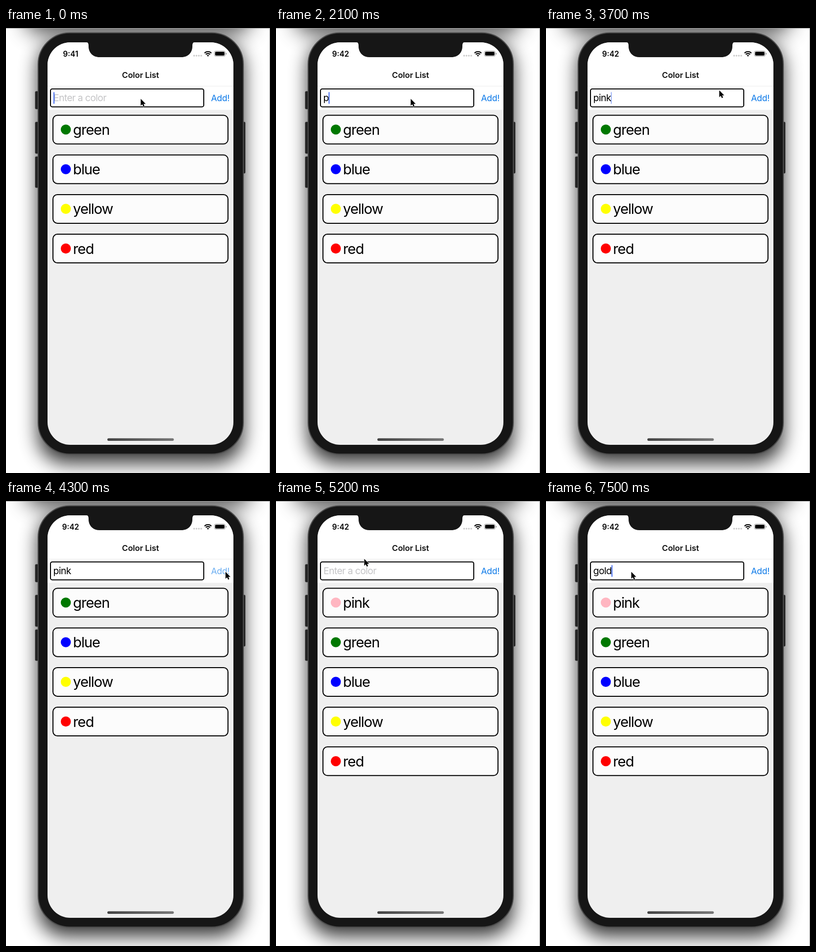
Recreate the animation shown at these times as an HTML page. Size 534 by 900 pixels, loop 8 s.

```html
<!DOCTYPE html>
<html lang="en">
<head>
<meta charset="utf-8">
<title>Color List</title>
<style>
  html, body { margin: 0; width: 100%; height: 100%; overflow: hidden; background: #fff; }
  svg { display: block; width: 100vw; height: 100vh; }
  text { font-family: Inter, "Liberation Sans", sans-serif; font-optical-sizing: none; }
  .bold { font-weight: 600; text-anchor: middle; }
  .field { font-size: 19.3px; letter-spacing: -.034em; }
  .row text { font-size: 29px; letter-spacing: -.038em; }
  .row rect { fill: #fcfcfc; stroke: #000; stroke-width: 2; }
</style>
</head>
<body>
<svg viewBox="0 0 534 900">
  <defs>
    <filter id="blur" x="-30%" y="-30%" width="160%" height="160%"><feGaussianBlur stdDeviation="19"/></filter>
    <filter id="haze" x="-30%" y="-200%" width="160%" height="500%"><feGaussianBlur stdDeviation="22"/></filter>
    <linearGradient id="bar"><stop stop-color="#444"/><stop offset="1" stop-color="#777"/></linearGradient>
    <clipPath id="screen"><rect x="84" y="29" width="376" height="814" rx="46"/></clipPath>
  </defs>

  <!-- backdrop and shadows -->
  <rect width="534" height="900" fill="#fff"/>
  <rect x="42" y="-60" width="450" height="68" rx="20" opacity=".75" filter="url(#haze)"/>
  <rect x="65" y="24" width="415" height="856" rx="56" opacity=".8" filter="url(#blur)"/>
  <path d="M0 .5H534M533.5 0V900" stroke="#999"/>

  <!-- phone -->
  <g fill="#242424" stroke="#444" stroke-width=".6">
    <rect x="59" y="128" width="9" height="36" rx="2"/>
    <rect x="59" y="190" width="9" height="64" rx="2"/>
    <rect x="59" y="260" width="9" height="63" rx="2"/>
    <rect x="476" y="190" width="8" height="104" rx="2"/>
  </g>
  <rect x="65" y="9.8" width="415" height="852" rx="64" fill="#161616" stroke="#4c4c4c" stroke-width="2"/>
  <g clip-path="url(#screen)">
    <rect x="84" y="29" width="376" height="814" fill="#efefef"/>
    <rect x="84" y="29" width="376" height="136.5" fill="#fff"/>
    <path d="M84 117.5H460" stroke="#ededed"/>
  </g>
  <path d="M160 28q7 0 7 7v2c0 13 9 22 22 22h166c13 0 22-9 22-22v-2q0-7 7-7z" fill="#161616"/>

  <!-- status bar -->
  <text id="clock" class="bold" x="130.7" y="57.5" font-size="15.3"></text>
  <g fill="#ccc">
    <circle cx="380.5" cy="56" r="1.8"/><circle cx="385.3" cy="56" r="1.8"/>
    <circle cx="390.1" cy="56" r="1.8"/><circle cx="394.9" cy="56" r="1.8"/>
  </g>
  <path d="M401.6 50.7a9.7 9.7 0 0 1 13.8 0M404.1 53.5a6.2 6.2 0 0 1 8.8 0" fill="none" stroke="#000" stroke-width="2.1"/>
  <path d="M408.5 57.8l-2.2-2.3a3.1 3.1 0 0 1 4.4 0z"/>
  <rect x="421.5" y="46.5" width="22" height="10.8" rx="3" fill="none" stroke="#999"/>
  <rect x="423" y="48" width="19" height="7.8" rx="1.7"/>
  <path d="M444.8 50q1.6.5 1.6 2t-1.6 2z" fill="#888"/>

  <!-- header -->
  <text class="bold" x="272" y="101.3" font-size="16.5" letter-spacing="-.1" fill="#111">Color List</text>
  <rect x="90" y="123.2" width="310" height="36.2" rx="3.5" fill="#fff" stroke="#000" stroke-width="2"/>
  <text id="hint" class="field" x="96" y="148.4" fill="#c4c4c6">Enter a color</text>
  <text id="typed" class="field" x="95.5" y="148.4"></text>
  <rect id="caret" y="129.5" width="2" height="24" rx="1" fill="#426bf2"/>
  <text id="add" x="414.7" y="148" font-size="17.4" letter-spacing="-.15" fill="#0a78e8">Add!</text>

  <g id="list"></g>
  <rect x="205" y="829.7" width="134.5" height="5.2" rx="2.6" fill="url(#bar)"/>
  <path id="pointer" d="M0 0V14L3.2 11 5.2 15.7 7.7 14.6 5.7 10.2H10Z" stroke="#fff" stroke-width="1.2" paint-order="stroke"/>
</svg>
<script>
const $ = id => document.getElementById(id);
const LOOP = 8000, STEP = 100, PITCH = 80.2, KEY_GAP = 165;
const CLOCK_TICK = 1400, TYPE_PINK = 2100, ADDED = 4500, FOCUS = 5800, TYPE_GOLD = 7000;

const clamp = v => Math.max(0, Math.min(1, v));
const ramp = (t, from, length) => clamp((t - from) / length);

const colors = { pink: '#ffb6c1', green: '#007800', blue: '#00f', yellow: '#ff0', red: '#f00' };
$('list').innerHTML = Object.entries(colors).map(([name, fill], i) => `
  <g class="row" transform="translate(0 ${i * PITCH})">
    <rect x="95" y="176.5" width="354" height="58" rx="9"/>
    <circle cx="121" cy="205.4" r="10.2" fill="${fill}"/>
    <text x="135.5" y="216">${name}</text>
  </g>`).join('');
const newRow = $('list').firstElementChild;

// The field's text and the moment of the last key press or focus
function fieldAt(t) {
  const [word, start, focus] = t < ADDED ? ['pink', TYPE_PINK, 0] : ['gold', TYPE_GOLD, FOCUS];
  const count = Math.min(word.length, Math.floor((t - start) / KEY_GAP) + 1);
  return count > 0
    ? { text: word.slice(0, count), since: start + (count - 1) * KEY_GAP }
    : { text: '', since: focus };
}

// Solid at first, then fading out and in once a second
function blink(age) {
  if (age < 0) return 0;
  if (age < 300) return 1;
  return clamp((Math.abs((age + 700) % 1000 - 500) - 100) / 400);
}

// The pointer flies to the button in an even arc and returns with a soft landing
function pointerAt(t) {
  const there = ramp(t, 3200, 1100), back = ramp(t, 4800, 700);
  const x = 272.5 + 171.5 * there - 271.5 * (1 - (1 - back) ** 4.5);
  const y = 143.3 - 17.5 * Math.sin(Math.PI * there) - 27 * Math.sin(Math.PI * back);
  return `translate(${x} ${y})`;
}

function draw(t) {
  const { text, since } = fieldAt(t), added = t >= ADDED;
  $('typed').textContent = text;
  $('hint').style.opacity = text ? 0 : 1;
  $('caret').setAttribute('x', 96 + (text ? $('typed').getComputedTextLength() - .8 : 0));
  $('caret').style.opacity = blink(t - since);
  $('add').style.opacity = 1 - .78 * Math.min(ramp(t, 4200, 200), 1 - ramp(t, ADDED, 300));
  $('clock').textContent = t < CLOCK_TICK ? '9:41' : '9:42';
  newRow.style.display = added ? '' : 'none';
  $('list').setAttribute('transform', `translate(0 ${added ? 0 : -PITCH})`);
  $('pointer').setAttribute('transform', pointerAt(t));
}

const start = performance.now();
function frame() {
  const t = (performance.now() - start) % LOOP;
  draw(Math.floor(t / STEP) * STEP);
  requestAnimationFrame(frame);
}
frame();
</script>
</body>
</html>
```
